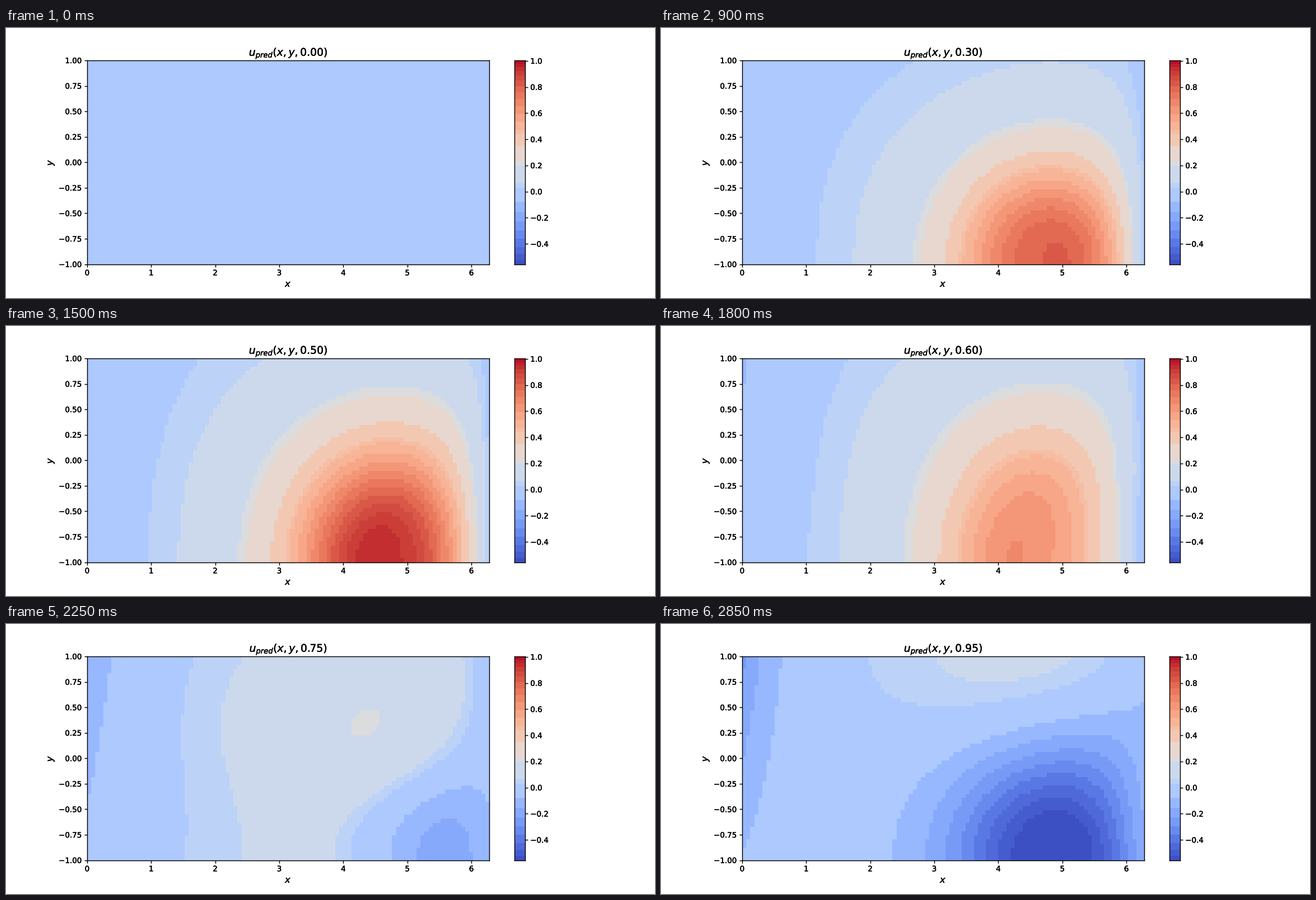
A matplotlib script for the animation above (3000 ms loop, 1159x483 px).

```python
import numpy as np
import matplotlib.pyplot as plt
from matplotlib.animation import FuncAnimation
from matplotlib.patheffects import withStroke
from matplotlib.text import Text

FRAMES, INTERVAL, DT = 20, 150, 0.05
SCALE = 0.966  # 12 x 5 inch layout on a 100 dpi stage
LINE = 1.05
LOW, HIGH = -0.556, 1.004
X_END = 2 * np.pi

plt.rcParams.update({
    "font.family": "DejaVu Sans",
    "font.size": 10 * SCALE,
    "axes.linewidth": LINE,
    "xtick.major.width": LINE,
    "ytick.major.width": LINE,
})

# Colour bands grow narrower towards both ends of the scale
blue_edges = LOW + (-0.08 - LOW) * np.linspace(0, 1, 9)**1.3
middle_edges = [0.03, 0.065, 0.2, 0.23, 0.35, 0.44]
red_edges = HIGH - (HIGH - 0.47) * np.linspace(1, 0, 14)**1.6
EDGES = np.concatenate([blue_edges, middle_edges, red_edges])
CENTRES = (EDGES[:-1] + EDGES[1:]) / 2
COLORS = plt.get_cmap("coolwarm")((CENTRES - LOW) / (HIGH - LOW))[:, :3]

x_edges = np.linspace(0, X_END, 100)
y_edges = np.linspace(-1, 1, 50)
x, y = np.meshgrid(x_edges[:-1], y_edges[:-1])


def signal(t):
    """A positive pulse followed by a growing negative swing."""
    return np.sin(np.pi * t / 0.85)**2 - 3.4 * np.maximum(t - 0.5, 0)**2


def field(t):
    """The signal spreads from a spot on the lower edge, later with distance."""
    height, gap = y + 1, X_END - x
    lag = 1 + 0.055 * (4.75 - x) + 0.11 * height**2.4
    distance = np.hypot((x - 4.7) / 1.55, height / 1.1)
    walls = np.tanh(x / 1.6) * np.tanh(gap / 0.5)
    wave = 1.02 * signal(t / lag) * walls / (1 + distance**3)

    left_dip = 0.44 * max(t - 0.4, 0) * (0.3 + 0.35 * height)
    right_dip = 0.35 * max(t - 0.5, 0) * (0.7 - 0.3 * y)
    return wave - left_dip * np.exp(-x / 0.6) - right_dip * np.exp(-gap / 0.6)


def cell_colors(t):
    return COLORS[np.digitize(field(t), EDGES[1:-1])]


fig = plt.figure(figsize=(11.59, 4.83), dpi=100, facecolor="white")
ax = fig.add_axes([0.125, 0.125, 0.62, 0.755])
mesh = ax.pcolormesh(x_edges, y_edges, cell_colors(0))
ax.set_xlim(0, X_END)
ax.set_ylim(-1, 1)
ax.set_xlabel("$x$", fontsize=12 * SCALE)
ax.set_ylabel("$y$", fontsize=12 * SCALE)
title = ax.set_title("", fontsize=14 * SCALE)

bar_ax = fig.add_axes([0.78375, 0.125, 0.01573, 0.755])
bar_ax.pcolormesh([0, 1], EDGES, COLORS[:, None, :])
bar_ax.set_ylim(LOW, HIGH)
bar_ax.set_xticks([])
bar_ax.yaxis.tick_right()
bar_ax.set_yticks(np.linspace(-0.4, 1, 8).round(1))

# Slightly heavier lettering
fig.canvas.draw()
for text in fig.findobj(Text):
    text.set_path_effects([withStroke(linewidth=0.35, foreground="black")])


def update(i):
    t = i * DT
    mesh.set_array(cell_colors(t))
    title.set_text(f"$u_{{pred}}(x, y, {t:.2f})$")
    return mesh, title


anim = FuncAnimation(fig, update, frames=FRAMES, interval=INTERVAL,
                     repeat=True, repeat_delay=0, blit=False)
plt.show()
```
